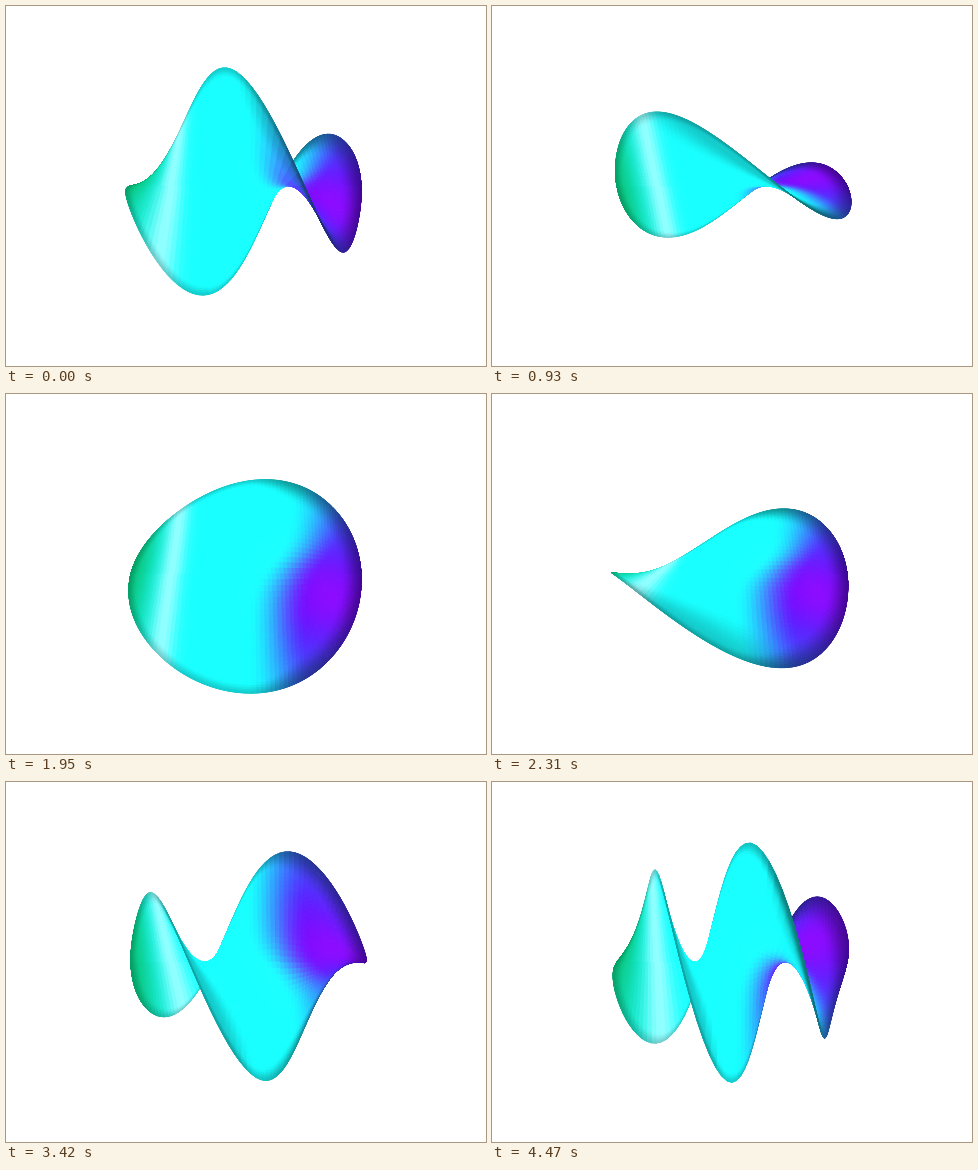
An HTML page with a canvas that plays this animation: 480x360 px, repeating every 4500 ms.

```html
<!DOCTYPE html>
<html lang="en">
<head>
<meta charset="utf-8">
<title>Twisting disc</title>
<style>
html, body { margin: 0; width: 100%; height: 100%; overflow: hidden; background: #fff; }
canvas { display: block; width: 480px; height: 360px; }
</style>
</head>
<body>
<canvas id="stage" width="480" height="360"></canvas>
<script>
const ctx = document.getElementById('stage').getContext('2d');
const LOOP = 4500, STEP = 30;
const CX = 240, CY = 180, R = 115, PERSP = 0.295;
const COLS = 84, ROWS = 56;
const FLAT_AT = 1.675; // seconds; the disc untwists before and winds up after

const clamp = v => Math.min(1, Math.max(0, v));
const smooth = (lo, hi, v) => {
  const k = clamp((v - lo) / (hi - lo));
  return k * k * (3 - 2 * k);
};
const bump = (v, width) => Math.exp(-((v / width) ** 2));

// twist per radius and turn of the middle chord, in radians
function poseAt(ms) {
  const u = ms / 1000 - FLAT_AT;
  const wind = Math.abs(u) - 0.24 * smooth(0, 0.6, Math.abs(u));
  return {
    twist: 1.565 * wind,
    turn: -Math.sign(u) * 2.57 * wind + 0.07 * Math.min(0, u) ** 2
  };
}

// The colouring belongs to the disc: green rim, pale band, cyan, violet spot.
function shade({ x, s, z }) {
  const border = 0.27 + 0.2 * Math.tanh(4 * (s - 0.1));
  const far = clamp(((s + 0.2) / 0.8) ** 2);
  const violet = smooth(-0.06, 0.44, x - border) * (1 - 0.45 * far);
  const spot = bump(Math.hypot(x - 0.72, s + 0.2), 0.36);
  const left = smooth(-0.66, -1, x);
  const band = bump(x + 0.65, 0.1);

  const q = x * x + s * s;
  const right = smooth(0, 0.5, x);
  const rim = smooth(0.86 - 0.2 * right, 1.02, q);
  const near = smooth(0.5, 0.85, z);
  const light = (1 - (0.2 + 0.2 * right) * rim) * (1 - 0.2 * near);

  const red = 25 + 120 * band - 15 * left + 60 * violet + 55 * spot;
  const green = 255 - 55 * left - 243 * violet;
  const blue = 255 - 125 * left;
  return 'rgb(' + [red, green, blue].map(c => Math.round(clamp(c / 255) * 255 * light)).join(',') + ')';
}

function draw(ms) {
  const { twist, turn } = poseAt(ms);

  function point(u, v) {
    const x = -Math.cos(Math.PI * u / COLS);
    const s = Math.sqrt(Math.max(0, 1 - x * x)) * Math.sin(Math.PI * (v / ROWS - 0.5));
    const angle = turn + twist * x;
    const z = s * Math.sin(angle);
    const k = R / (1 - PERSP * z);
    return { px: CX + x * k, py: CY - s * Math.cos(angle) * k, x, s, z };
  }

  const grid = [];
  for (let u = 0; u <= COLS; u++) {
    const col = [];
    for (let v = 0; v <= ROWS; v++) col.push(point(u, v));
    grid.push(col);
  }

  const cells = [];
  for (let u = 0; u < COLS; u++) {
    for (let v = 0; v < ROWS; v++) {
      const mid = point(u + 0.5, v + 0.5);
      cells.push({
        z: mid.z,
        color: shade(mid),
        corners: [grid[u][v], grid[u + 1][v], grid[u + 1][v + 1], grid[u][v + 1]]
      });
    }
  }
  cells.sort((a, b) => a.z - b.z);

  ctx.fillStyle = '#fff';
  ctx.fillRect(0, 0, 480, 360);
  ctx.lineWidth = 1;
  ctx.lineJoin = 'round';
  for (const { color, corners } of cells) {
    ctx.fillStyle = ctx.strokeStyle = color;
    ctx.beginPath();
    for (const p of corners) ctx.lineTo(p.px, p.py);
    ctx.closePath();
    ctx.fill();
    ctx.stroke();
  }
}

const start = performance.now();
let shown = -1;

function tick() {
  const ms = Math.floor(((performance.now() - start) % LOOP) / STEP) * STEP;
  if (ms !== shown) draw(shown = ms);
  requestAnimationFrame(tick);
}
tick();
</script>
</body>
</html>
```
